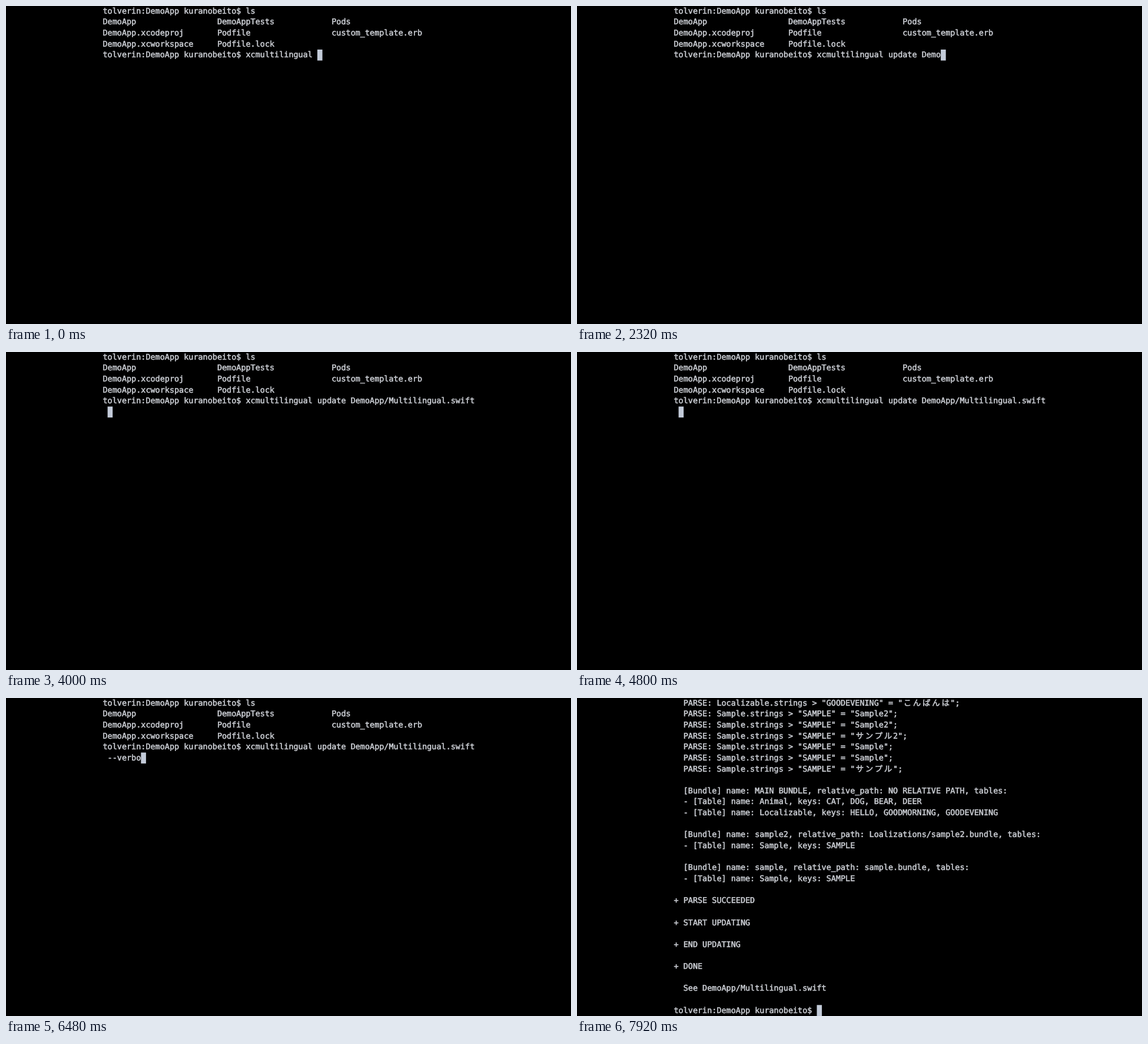
Recreate the animation shown at these times as an HTML page. Size 960 px wide and 540 px high, loop 8 s.

```html
<!DOCTYPE html>
<html lang="en">
<head>
<meta charset="utf-8">
<title>Terminal session</title>
<style>
  html, body { margin: 0; width: 100%; height: 100%; overflow: hidden; background: #000; }
  svg { display: block; width: 960px; height: 540px; }
  text {
    font: 13.46px "DejaVu Sans Mono", monospace;
    fill: #c9ccd2;
    stroke: #c9ccd2;
    stroke-width: .55px;
    white-space: pre;
    text-rendering: geometricPrecision;
  }
  .kana { font-family: "Noto Sans CJK JP", "Noto Sans CJK", sans-serif; letter-spacing: 2.74px; }
  #cursor { fill: #c3cbd9; }
</style>
</head>
<body>
<svg viewBox="0 0 960 540">
  <g id="screen"></g>
  <rect id="cursor" width="8.6" height="18.64"/>
</svg>
<script>
const LOOP = 8000, COLS = 78;
const LEFT = 164.5, TOP = -0.6, CELL = 8.1, ROW = 18.64, BASELINE = 13.3;
const PROMPT = 'tolverin:DemoApp kuranobeito$ ';

const SHELL = `${PROMPT}ls
DemoApp                 DemoAppTests            Pods
DemoApp.xcodeproj       Podfile                 custom_template.erb
DemoApp.xcworkspace     Podfile.lock
${PROMPT}xcmultilingual `;

const OUTPUT = `  PARSE: Localizable.strings > "GOODEVENING" = "こんばんは";
  PARSE: Sample.strings > "SAMPLE" = "Sample2";
  PARSE: Sample.strings > "SAMPLE" = "Sample2";
  PARSE: Sample.strings > "SAMPLE" = "サンプル2";
  PARSE: Sample.strings > "SAMPLE" = "Sample";
  PARSE: Sample.strings > "SAMPLE" = "Sample";
  PARSE: Sample.strings > "SAMPLE" = "サンプル";

  [Bundle] name: MAIN BUNDLE, relative_path: NO RELATIVE PATH, tables:
  - [Table] name: Animal, keys: CAT, DOG, BEAR, DEER
  - [Table] name: Localizable, keys: HELLO, GOODMORNING, GOODEVENING

  [Bundle] name: sample2, relative_path: Loalizations/sample2.bundle, tables:
  - [Table] name: Sample, keys: SAMPLE

  [Bundle] name: sample, relative_path: sample.bundle, tables:
  - [Table] name: Sample, keys: SAMPLE

+ PARSE SUCCEEDED

+ START UPDATING

+ END UPDATING

+ DONE

  See DemoApp/Multilingual.swift

${PROMPT}`;
const OUTPUT_AT = 7680;

// [time in ms, typed or completed text]
const KEYS = [
  [320, 'u'], [480, 'p'], [560, 'd'], [720, 'a'], [800, 't'], [960, 'e'], [1120, ' '],
  [1920, 'D'], [2080, 'e'], [2160, 'm'], [2320, 'o'], [2480, 'A'], [2640, 'p'], [2800, 'p'],
  [3200, '/'], [3520, 'M'], [3680, 'u'], [4000, 'ltilingual.swift '],
  [5600, '-'], [5760, '-'], [6000, 'v'], [6080, 'e'], [6240, 'r'], [6320, 'b'],
  [6400, 'o'], [6560, 's'], [6640, 'e'], [7040, '\n']
];

const screen = document.getElementById('screen');
const cursor = document.getElementById('cursor');

function bufferAt(time) {
  if (time >= OUTPUT_AT) return OUTPUT;
  return SHELL + KEYS.filter(([at]) => at <= time).map(([, text]) => text).join('');
}

function wrap(line) {
  return line.match(new RegExp(`.{1,${COLS}}`, 'g')) || [''];
}

function addText(text, col, row, wide) {
  const node = document.createElementNS('http://www.w3.org/2000/svg', 'text');
  node.textContent = text;
  node.setAttribute('x', LEFT + col * CELL + (wide ? 1.37 : 0));
  node.setAttribute('y', TOP + row * ROW + BASELINE);
  if (wide) node.setAttribute('class', 'kana');
  screen.append(node);
}

// Draws one line and returns the column after its last character.
function drawLine(line, row) {
  let col = 0;
  for (const run of line.split(/([\u3040-\u30ff]+)/)) {
    if (!run) continue;
    const wide = /[\u3040-\u30ff]/.test(run);
    addText(run, col, row, wide);
    col += run.length * (wide ? 2 : 1);
  }
  return col;
}

function draw(buffer) {
  screen.replaceChildren();
  const lines = buffer.split('\n').flatMap(wrap);
  const ends = lines.map(drawLine);
  cursor.setAttribute('x', LEFT + ends[ends.length - 1] * CELL);
  cursor.setAttribute('y', TOP + (lines.length - 1) * ROW);
}

let shown = null;
const start = performance.now();

function tick(now) {
  const buffer = bufferAt(Math.max(0, now - start) % LOOP);
  if (buffer !== shown) draw(shown = buffer);
  requestAnimationFrame(tick);
}
tick(start);
</script>
</body>
</html>
```
